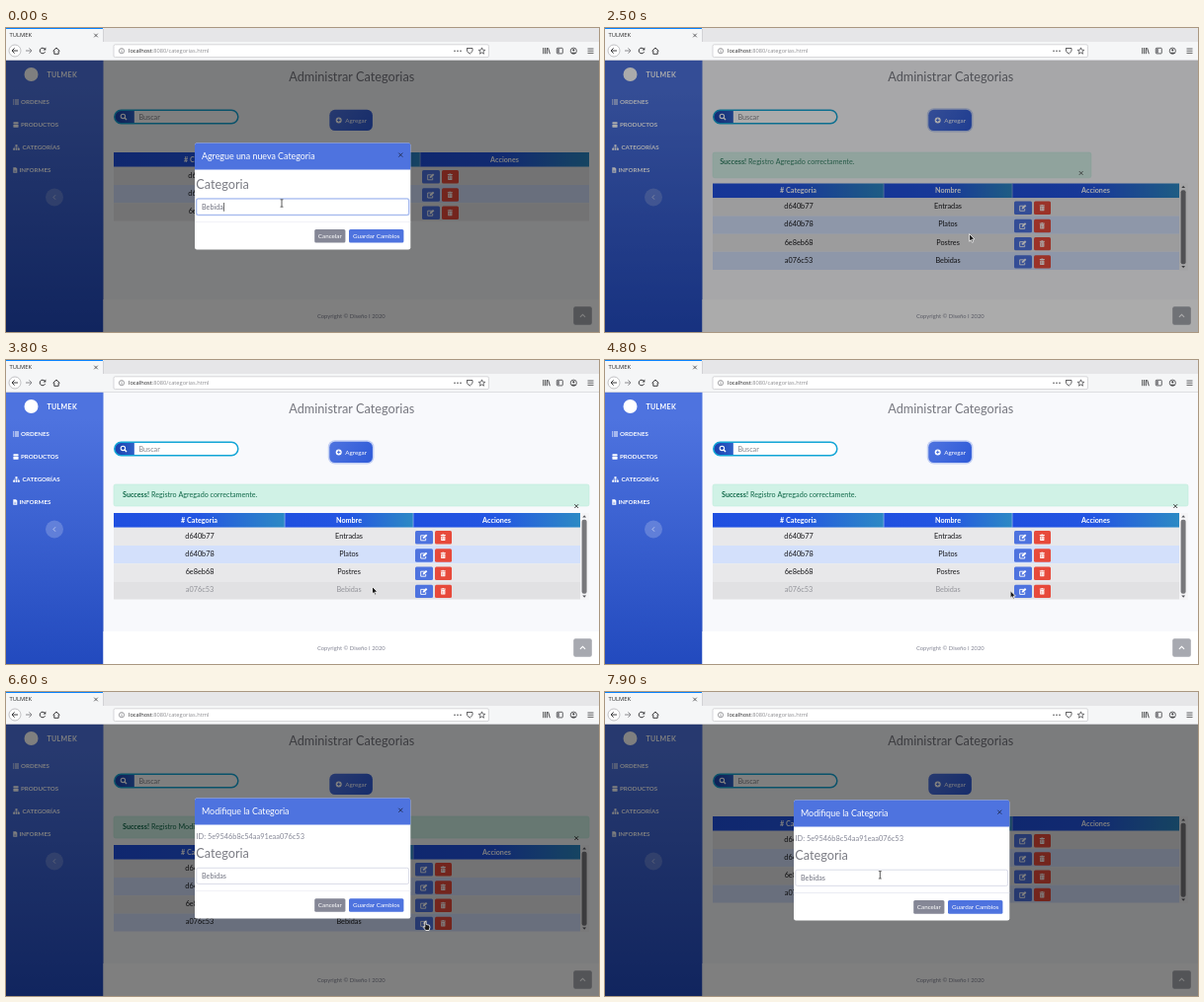
Write an HTML page with a canvas that moves like this. It is 600 by 308 pixels and loops after 8000 ms.

```html
<!DOCTYPE html>
<html lang="es">
<head>
<meta charset="utf-8">
<title>Categorias</title>
<style>
html, body { margin: 0; width: 100%; height: 100%; overflow: hidden; background: #f8f9fc; }
canvas { display: block; width: 600px; height: 308px; }
</style>
</head>
<body>
<canvas id="stage"></canvas>
<script>
const W = 600, H = 308, LOOP = 8000;
const canvas = document.getElementById('stage');
const ctx = canvas.getContext('2d');
const dpr = window.devicePixelRatio || 1;
canvas.width = W * dpr;
canvas.height = H * dpr;

const PAGE_FONT = 'Lato, sans-serif', UI_FONT = '"Open Sans", sans-serif';
const BRAND = 'TULMEK';
const BLUE = '#4e73df', BLUE_HOVER = '#2e59d9', GRAY = '#858796';

const clamp = v => Math.max(0, Math.min(1, v));
const span = (t, from, length) => clamp((t - from) / length);
const swing = p => 0.5 - Math.cos(p * Math.PI) / 2;
const easeOut = p => 1 - (1 - p) ** 2.2;

// ---------- drawing helpers ----------
function box(x, y, w, h, fill, r = 0, stroke, lw = 1) {
  ctx.beginPath();
  ctx.roundRect(x, y, w, h, r);
  if (fill) { ctx.fillStyle = fill; ctx.fill(); }
  if (stroke) { ctx.strokeStyle = stroke; ctx.lineWidth = lw; ctx.stroke(); }
}

function disc(x, y, r, fill, stroke, lw = 1) {
  ctx.beginPath();
  ctx.arc(x, y, r, 0, 7);
  if (fill) { ctx.fillStyle = fill; ctx.fill(); }
  if (stroke) { ctx.strokeStyle = stroke; ctx.lineWidth = lw; ctx.stroke(); }
}

function path(points, color, lw = 1, fill) {
  ctx.beginPath();
  points.forEach(([x, y], i) => i ? ctx.lineTo(x, y) : ctx.moveTo(x, y));
  if (fill) { ctx.closePath(); ctx.fillStyle = fill; ctx.fill(); }
  if (color) { ctx.strokeStyle = color; ctx.lineWidth = lw; ctx.stroke(); }
}

function text(str, x, y, size, color, { weight = 400, align = 'left', font = PAGE_FONT, gap = 0 } = {}) {
  ctx.font = `${weight} ${size}px ${font}`;
  ctx.letterSpacing = gap + 'px';
  ctx.textAlign = align;
  ctx.fillStyle = color;
  ctx.fillText(str, x, y + size * 0.33);
  return ctx.measureText(str).width;
}

function gradient(x0, y0, x1, y1, ...colors) {
  const g = ctx.createLinearGradient(x0, y0, x1, y1);
  colors.forEach((c, i) => g.addColorStop(i / (colors.length - 1), c));
  return g;
}

function at(x, y, draw) {
  ctx.save();
  ctx.translate(x, y);
  draw();
  ctx.restore();
}

function cross(x, y, r, color, lw = 0.9) {
  path([[x - r, y - r], [x + r, y + r]], color, lw);
  path([[x - r, y + r], [x + r, y - r]], color, lw);
}

// ---------- icons, centred on 0,0 ----------
const icons = {
  list() {
    for (const y of [-2, 0, 2]) {
      box(-3, y - 0.5, 1, 1, '#fff');
      box(-1.3, y - 0.5, 4.3, 1, '#fff');
    }
  },
  crate() {
    box(-2.6, -2.8, 5.2, 2, '#fff', 0.6);
    box(-2.6, -0.3, 5.2, 3, '#fff', 0.4);
  },
  tree() {
    box(-1, -2.8, 2, 1.8, '#fff');
    path([[0, -1], [0, 1]], '#fff', 0.6);
    path([[-2.4, 1.2], [-2.4, 0], [2.4, 0], [2.4, 1.2]], '#fff', 0.6);
    for (const x of [-3.3, -0.9, 1.5]) box(x, 1, 1.8, 1.8, '#fff');
  },
  file() {
    path([[-2, -2.8], [0.7, -2.8], [2, -1.5], [2, 2.8], [-2, 2.8]], null, 0, '#fff');
    path([[-1, 0.2], [1, 0.2]], '#3b62d2', 0.5);
    path([[-1, 1.4], [1, 1.4]], '#3b62d2', 0.5);
  },
  edit() {
    path([[1, -2], [-3, -2], [-3, 3], [2, 3], [2, 0.8]], '#fff', 0.9);
    path([[-1, 1.2], [-0.8, -0.4], [2.3, -3.3], [3.6, -2], [0.6, 1]], null, 0, '#fff');
  },
  trash() {
    box(-2.5, -2.8, 5, 1, '#fff');
    box(-0.9, -3.3, 1.8, 0.8, '#fff');
    box(-2.1, -1.4, 4.2, 4.5, '#fff', 0.5);
    for (const x of [-0.9, 0.5]) box(x, -0.7, 0.4, 3, '#e74a3b');
  },
  search() {
    disc(-0.6, -0.6, 2.2, null, '#fff', 1.1);
    path([[1, 1], [3, 3]], '#fff', 1.4);
  },
  plus() {
    disc(0, 0, 3, '#fff');
    path([[-1.7, 0], [1.7, 0]], '#3b64da', 0.9);
    path([[0, -1.7], [0, 1.7]], '#3b64da', 0.9);
  }
};
const icon = (name, x, y) => at(x, y, icons[name]);

// ---------- browser frame ----------
function drawBrowser() {
  const ink = '#3c3c3e';
  box(0, 0, W, 14, '#e6e6e8');
  box(0, 0, 98, 14, '#f5f6f7');
  box(0, 0, 98, 1, '#0a84ff');
  box(98, 1, 0.6, 13, '#c4c4c8');
  text(BRAND, 3.5, 7.5, 5.8, '#222', { font: UI_FONT });
  cross(91, 7.5, 1.8, ink, 0.8);
  box(0, 14, W, 18.5, '#f5f6f7');
  box(0, 32, W, 0.6, '#c8c8cc');

  disc(9, 23, 6, '#fff', '#a9a9ad', 0.7);
  path([[12, 23], [6, 23]], ink, 1);
  path([[8.6, 20.4], [6, 23], [8.6, 25.6]], ink, 1);
  path([[20, 23], [26, 23]], '#8a8a8e', 1);
  path([[23.4, 20.4], [26, 23], [23.4, 25.6]], '#8a8a8e', 1);
  ctx.beginPath();
  ctx.arc(37, 23, 2.8, 0.4, 5.6);
  ctx.strokeStyle = ink;
  ctx.lineWidth = 1;
  ctx.stroke();
  path([[40.3, 19.6], [40.3, 22.4], [37.6, 22.4]], null, 0, ink);
  path([[47.6, 23.3], [51, 20], [54.4, 23.3]], ink, 1);
  path([[48.8, 23], [48.8, 26.3], [53.2, 26.3], [53.2, 23]], ink, 1);

  box(109, 16.8, 379.5, 12.8, '#fff', 1.5, '#c6c6ca', 0.7);
  disc(117, 23.2, 2.6, null, '#77777b', 0.7);
  box(116.7, 22.8, 0.7, 2, '#77777b');
  box(116.7, 21.6, 0.7, 0.7, '#77777b');
  const w = text('localhost', 124, 23.2, 5.7, '#1c1c1e', { font: UI_FONT });
  text(':8080/categorias.html', 124 + w, 23.2, 5.7, '#8c8c90', { font: UI_FONT });
  for (const x of [454, 457, 460]) disc(x, 23.2, 0.75, ink);
  path([[466.5, 20.5], [472, 20.5], [472, 23.5], [469.2, 26.2], [466.5, 23.5], [466.5, 20.2]], ink, 0.8);
  const star = [];
  for (let i = 0; i <= 10; i++) {
    const r = i % 2 ? 1.5 : 3.5, a = i * Math.PI / 5 - Math.PI / 2;
    star.push([481.5 + r * Math.cos(a), 23.4 + r * Math.sin(a)]);
  }
  path(star, ink, 0.7);

  for (const x of [543.7, 545.6, 547.4]) path([[x, 20], [x, 26.2]], ink, 0.9);
  path([[548.6, 20.2], [550.3, 26.2]], ink, 0.9);
  box(557.3, 20.3, 6, 5.6, null, 0.8, ink, 0.8);
  box(557.6, 20.5, 2.4, 5.2, '#88888c');
  disc(574.3, 23.2, 3.1, null, ink, 0.8);
  disc(574.3, 22.3, 1.1, ink);
  path([[572.3, 25.3], [576.3, 25.3]], ink, 1.1);
  for (const y of [21, 23.2, 25.4]) path([[588.5, y], [594.5, y]], ink, 0.8);
}

// ---------- page ----------
function drawSidebar() {
  box(0, 32.5, 98.5, 276, gradient(0, 60, 0, H, BLUE, '#224abe'));
  disc(25.5, 47, 7, '#fff');
  text(BRAND, 41.5, 47.5, 7, '#fff', { weight: 700, gap: 0.35 });
  const links = [
    ['list', 10, 15, 75, 'ORDENES'], ['crate', 10, 15, 98, 'PRODUCTOS'],
    ['tree', 10.5, 16.5, 121, 'CATEGORÍAS'], ['file', 9.3, 13.5, 144, 'INFORMES']
  ];
  for (const [name, ix, tx, y, label] of links) {
    icon(name, ix, y);
    text(label, tx, y + 0.2, 6.2, '#fff', { weight: 700 });
  }
  disc(49, 171.5, 9, 'rgba(255,255,255,.2)');
  path([[50, 169.3], [48, 171.5], [50, 173.7]], 'rgba(255,255,255,.6)', 0.9);
}

function drawTools(t) {
  text('Administrar Categorias', 349.7, 50.3, 12.7, '#76777f', { align: 'center' });

  box(109.8, 83.3, 125, 13.4, '#fff', 6.7);
  box(109.8, 83.3, 20, 13.4, gradient(110, 0, 130, 0, '#1a3fae', '#2f62c8'), [6.7, 0, 0, 6.7]);
  box(109.8, 83.3, 125, 13.4, null, 6.7, '#12a5d6', 1.5);
  icon('search', 119, 90);
  text('Buscar', 134.5, 90.2, 7.2, '#85868c');

  if (t > 2450 && t < 6200) box(325.8, 81.3, 46.6, 24.2, '#c3d0f4', 7);
  box(327.3, 82.8, 43.6, 21.2, gradient(327, 83, 371, 104, BLUE, '#2f5bd8'), 5.5);
  icon('plus', 336.7, 93.4);
  text('Agregar', 343.2, 93.5, 6.3, '#fff');
}

// size 0..1; while resizing the box grows round its floated close mark
function drawAlert(size, message) {
  if (size <= 0) return;
  const w = 481 * size, h = size < 1 ? 32.5 * size : 22;
  ctx.save();
  ctx.globalAlpha = size;
  box(109, 126, w, h, '#d0f2e6', 2, '#bdebdb', 0.6);
  if (size < 1) {
    ctx.beginPath();
    ctx.rect(109, 126, w, h);
    ctx.clip();
  }
  const y = 131.6 + 5.5 * size;
  const label = text('Success!', 109 + 9 * size, y, 7.2, '#0f6848', { weight: 700 });
  text(message, 109 + 9 * size + label + 2, y, 7.2, '#0f6848');
  cross(109 + w - 12.8 * size, 142.6 + 5.5 * size, 1.9, '#333', 0.9);
  ctx.restore();
}

const ROWS = [['d640b77', 'Entradas'], ['d640b78', 'Platos'], ['6e8eb68', 'Postres'], ['a076c53', 'Bebidas']];
const ROW_H = 18.2, HEAD_H = 14.8;

function drawTable(top, count, mouse, active) {
  const scroll = count > 3;
  const edges = scroll ? [109, 282, 412, 581] : [109, 288, 419, 590];
  const right = edges[3], idX = (edges[0] + edges[1]) / 2 + 0.5, nameX = (edges[1] + edges[2]) / 2;

  ['# Categoria', 'Nombre', 'Acciones'].forEach((label, i) => {
    const a = edges[i], b = edges[i + 1];
    box(a, top, b - a, HEAD_H, gradient(a, top, b, top + HEAD_H, '#1f4fe0', '#2456e2', '#2c8ac4'));
    if (i) box(a - 0.3, top, 0.7, HEAD_H, '#9fb9ee');
    text(label, (a + b) / 2, top + 7.4, 7.2, '#fff', { weight: 700, align: 'center' });
  });

  for (let i = 0; i < count; i++) {
    const y = top + HEAD_H + i * ROW_H;
    const hover = active && mouse.y >= y && mouse.y < y + ROW_H && mouse.x < right;
    box(109, y, right - 109, ROW_H, hover ? '#e1e1e3' : i % 2 ? '#d3e0fb' : '#e8e8ea');
    const ink = hover ? '#929399' : '#17171a';
    text(ROWS[i][0], idX, y + 8.6, 7.3, ink, { align: 'center' });
    text(ROWS[i][1], nameX, y + 8.6, 7.3, ink, { align: 'center' });
    const bx = edges[2] + 2;
    const over = hover && mouse.x >= bx && mouse.x < bx + 18;
    box(bx, y + 3.3, 18, 13.4, over ? BLUE_HOVER : BLUE, 1.5);
    icon('edit', bx + 8.7, y + 10);
    box(bx + 20, y + 3.3, 17, 13.4, '#e74a3b', 1.5);
    icon('trash', bx + 28.3, y + 10);
  }

  if (scroll) {
    box(581, top, 9, 88, '#f4f4f6');
    path([[583.3, top + 4.5], [587, top + 4.5], [585.2, top + 2.3]], null, 0, '#55555a');
    path([[583.3, top + 83.5], [587, top + 83.5], [585.2, top + 85.7]], null, 0, '#55555a');
    box(582.6, top + 6.8, 5, 75, '#77777b', 2);
  }
}

function drawFooter() {
  box(98.5, 275, W - 98.5, 33, '#fff');
  text('Copyright © Diseño I 2020', 349.3, 291.8, 5.8, GRAY, { align: 'center' });
  box(574.2, 282.2, 18.6, 18.6, '#a7a9b0', 2);
  path([[580.9, 292.8], [583.5, 290.3], [586.1, 292.8]], '#fff', 1.1);
}

// ---------- dialogs ----------
function button(x, y, w, label, fill) {
  box(x, y, w, 13.6, fill, 1.5);
  text(label, x + w / 2, y + 6.9, 6.25, '#fff', { align: 'center' });
}

function drawDialog({ title, top, height, id, value, focus, caret, saveHover }) {
  const bottom = top + height;
  box(191, top, 218.3, height, '#fff', 2.2);
  box(191, top, 218.3, 27, BLUE, [2.2, 2.2, 0, 0]);
  text(title, 198, top + 13.8, 8.9, '#fff');
  cross(399.3, top + 12.2, 2, '#202a4c', 0.9);
  if (id) text('ID: ' + id, 192.5, top + 39.4, 7.4, GRAY);

  text('Categoria', 192.3, bottom - 65.8, 12.7, '#7b7c84');
  const fy = bottom - 51.3;
  if (focus) box(191.8, fy - 0.9, 216.8, 18, '#c8d5f7', 2.5);
  box(192.8, fy, 214.8, 16.2, '#fff', 1.8, focus ? '#8fa8ea' : '#d1d3e2', 0.8);
  const w = text(value, 198, fy + 8.4, 7.2, '#6e707e');
  if (caret) box(198 + w + 0.4, fy + 4, 0.7, 8.6, '#333');

  box(191, bottom - 28.2, 218.3, 0.6, '#e3e6f0');
  button(312.2, bottom - 20.4, 31.2, 'Cancelar', GRAY);
  button(347, bottom - 20.4, 55.4, 'Guardar Cambios', saveHover ? BLUE_HOVER : BLUE);
}

function fadeDialog(opacity, slide, dialog) {
  if (opacity <= 0) return;
  ctx.save();
  ctx.globalAlpha = opacity;
  ctx.translate(0, -22 * slide);
  drawDialog(dialog);
  ctx.restore();
}

// ---------- pointer ----------
const TRACK = [
  [0, 279, 177.5], [650, 279, 177.5], [1450, 367.3, 209], [2250, 367.3, 209], [2450, 368.6, 208.6],
  [2700, 368.6, 208.6], [3250, 370.5, 229.5], [4200, 370.5, 229.5], [5100, 423.2, 235],
  [5950, 423.2, 235], [6200, 424.3, 232.5], [7050, 424.3, 232.5], [7650, 278.3, 185.3], [LOOP, 278.3, 185.3]
];

function mouseAt(t) {
  const i = TRACK.findIndex(p => p[0] > t);
  const [t0, x0, y0] = TRACK[i - 1], [t1, x1, y1] = TRACK[i];
  const p = swing((t - t0) / (t1 - t0));
  return { x: x0 + (x1 - x0) * p, y: y0 + (y1 - y0) * p };
}

const pointers = {
  arrow() {
    path([[0, 0], [0, 7.6], [1.7, 6.1], [2.9, 8.7], [4.1, 8.1], [3, 5.6], [5.3, 5.4]], '#eee', 0.9, '#1a1a1a');
  },
  hand() {
    path([[-0.6, 0.2], [0.7, 0.2], [0.9, 3], [4.2, 3.8], [4.6, 6], [3.8, 9], [0.4, 9], [-2.3, 5.6], [-1.6, 4.9], [-0.5, 5.8]],
      '#eee', 0.9, '#1a1a1a');
  },
  beam() {
    path([[-1.5, -3.7], [1.5, -3.7]], '#333', 0.7);
    path([[-1.5, 3.7], [1.5, 3.7]], '#333', 0.7);
    path([[0, -3.7], [0, 3.7]], '#333', 0.8);
  }
};

// ---------- scene ----------
function draw(t) {
  const mouse = mouseAt(t);
  const inside = (x, y, w, h) => mouse.x >= x && mouse.x <= x + w && mouse.y >= y && mouse.y <= y + h;

  const backdrop = t < 4000 ? 1 - span(t, 2450, 150) : span(t, 6250, 150);
  const saved = t >= 2080;
  const alert = t < 5000 ? swing(span(t, 2080, 600)) : 1 - swing(span(t, 7050, 600));
  const margin = alert < 1 ? 39.5 * alert : 29;
  const tableTop = 126 + margin;

  ctx.setTransform(dpr, 0, 0, dpr, 0, 0);
  ctx.globalAlpha = 1;
  box(0, 0, W, H, '#f8f9fc');
  drawSidebar();
  drawTools(t);
  drawAlert(alert, t < 6200 ? 'Registro Agregado correctamente.' : 'Registro Modificado correctamente.');
  drawTable(tableTop, saved ? 4 : 3, mouse, backdrop === 0);
  drawFooter();
  box(0, 32.5, W, H - 32.5, `rgba(0,0,0,${0.5 * backdrop})`);

  const adding = t < 2450, editing = t >= 6400;
  const saveHover = adding && t < 2250 && inside(347, 203, 55, 14);
  if (adding) {
    fadeDialog(1 - span(t, 2150, 150), easeOut(span(t, 2150, 300)), {
      title: 'Agregue una nueva Categoria', top: 116.4, height: 108,
      value: t < 250 ? 'Bebida' : 'Bebidas', focus: true,
      caret: t < 250 || Math.floor((t - 250) / 530) % 2 === 0, saveHover
    });
  }
  if (editing) {
    fadeDialog(span(t, 6400, 150), 1 - easeOut(span(t, 6400, 300)), {
      title: 'Modifique la Categoria', top: 109.5, height: 122,
      id: '5e9546b8c54aa91eaa076c53', value: 'Bebidas'
    });
  }
  drawBrowser();

  const onField = adding && inside(192, 173, 216, 17) || editing && inside(192, 180, 216, 16);
  const onEdit = t > 4200 && t < 7150 && inside(414, tableTop + 72, 18, 14);
  at(mouse.x, mouse.y, pointers[onField ? 'beam' : saveHover || onEdit ? 'hand' : 'arrow']);
}

const start = performance.now();
function tick() {
  draw((performance.now() - start) % LOOP);
  requestAnimationFrame(tick);
}
tick();
</script>
</body>
</html>
```
